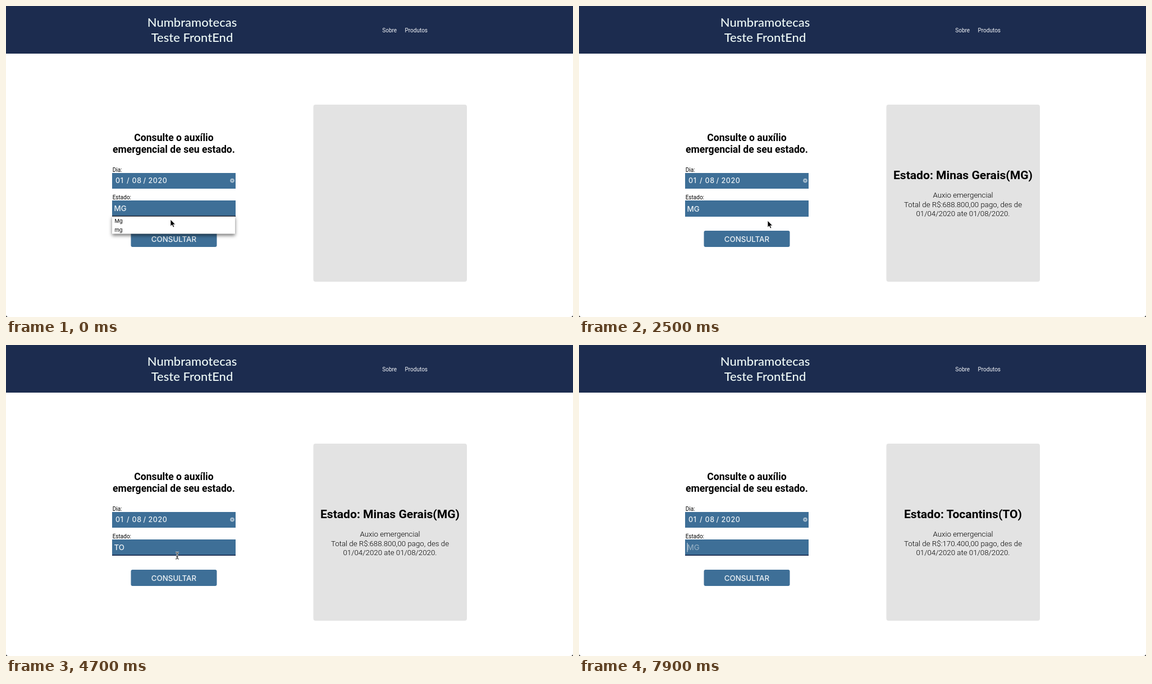
An HTML page for the animation above (8000 ms loop, 1010 px wide and 555 px high).

```html
<!DOCTYPE html>
<html lang="pt-BR">
<head>
<meta charset="utf-8">
<title>Consulta</title>
<style>
  html, body { margin: 0; width: 100%; height: 100%; overflow: hidden; background: #fff; }
  svg { display: block; width: 100%; height: 100%; }
  text { font-family: Roboto, sans-serif; white-space: pre; }
  .brand { font: 500 22px Lato, sans-serif; fill: #effbf8; }
  .nav { font-size: 10px; fill: #f4f6fa; }
  .heading { font-size: 17.6px; font-weight: 700; }
  .label { font-size: 10px; }
  .field { font: 500 13.3px Inter, sans-serif; fill: #eef3f6; }
  .date { font: 500 12.5px Inter, sans-serif; letter-spacing: .6px; fill: #eef3f6; }
  .option { font: 9.5px Inter, sans-serif; }
  .result { font-size: 21.1px; font-weight: 700; }
  .detail { font-size: 13.3px; font-weight: 300; }
  .mid { text-anchor: middle; }
  .blue { fill: #3e6f97; }
  #menu rect { filter: drop-shadow(0 3px 3px rgba(0, 0, 0, .55)); }
</style>
</head>
<body>
<svg viewBox="0 0 1010 555">
  <rect width="1010" height="85" fill="#1c2c4f"/>
  <g class="brand mid">
    <text class="brand" x="331.5" y="37">Numbramotecas</text>
    <text class="brand" x="331.5" y="64">Teste FrontEnd</text>
  </g>
  <text class="nav" x="670.3" y="47.3">Sobre</text>
  <text class="nav" x="710.5" y="47.3">Produtos</text>

  <g class="mid">
    <text class="heading" x="299" y="241">Consulte o auxílio</text>
    <text class="heading" x="299" y="262.3">emergencial de seu estado.</text>
  </g>

  <text class="label" x="189.7" y="295.5">Dia:</text>
  <rect class="blue" x="189" y="298" width="220" height="28"/>
  <text class="date" x="195" y="316">01</text>
  <text class="date" x="215" y="316">/</text>
  <text class="date" x="224.5" y="316">08</text>
  <text class="date" x="244.5" y="316">/</text>
  <text class="date" x="253.5" y="316">2020</text>
  <circle cx="403" cy="311.6" r="3.8" fill="#a9bfd0"/>
  <path d="M401.6 310.2l2.8 2.8m0-2.8l-2.8 2.8" stroke="#3e6f97"/>

  <text class="label" x="189.7" y="344.5">Estado:</text>
  <rect class="blue" x="189" y="347" width="220" height="29"/>
  <rect id="underline" x="189" y="374.3" width="220" height="1.7" fill="#1c2c4f"/>
  <text id="value" class="field" x="192.5"></text>
  <rect id="caret" y="353" width="1" height="16.5" fill="#dfe8ee"/>

  <rect class="blue" x="222.5" y="401" width="153" height="29" rx="3"/>
  <rect id="hover" x="222.5" y="401" width="153" height="29" rx="3" fill="#1f4a70"/>
  <text class="field mid" x="299" y="420.6">CONSULTAR</text>

  <g id="menu">
    <rect x="189" y="375" width="219" height="31.5" fill="#fff"/>
    <path d="M189 375.2h219" stroke="#222"/>
    <text class="option" x="193.5" y="387">Mg</text>
    <text class="option" x="193.5" y="402.7">mg</text>
  </g>

  <rect x="547.5" y="176" width="273.5" height="316" rx="4" fill="#e3e3e3"/>
  <g id="panel" class="mid">
    <text id="state" class="result" x="684" y="309.3"></text>
    <text class="detail" x="684" y="342">Auxio emergencial</text>
    <text id="total" class="detail" x="684" y="358.5"></text>
    <text class="detail" x="684" y="375">01/04/2020 ate 01/08/2020.</text>
  </g>

  <path d="M0 555v-4q0 4 4 4zM1010 555v-4q0 4-4 4z"/>

  <g id="cursor">
    <path id="arrow" d="M0 0V12.2L2.8 9.6 4.8 14 6.8 13.1 4.9 8.9H8.7Z" stroke="#fff" stroke-width=".8"/>
    <path id="hand" d="M-1 1.2q1-2 2 0V5q1-1 2 .4 1.2-.8 2 .6 1.8-.6 1.8 1.2V9.5L5.5 13.6H-.2L-4 8.6q.2-1.8 1.6-.8L-1 9Z" fill="#fff" stroke="#111"/>
    <g id="beam" fill="none">
      <path d="M-3-6Q0-6 0-4 0-6 3-6M0-4V4M-3 6Q0 6 0 4 0 6 3 6M-2 2H2" stroke="#fff" stroke-width="2.6"/>
      <path d="M-3-6Q0-6 0-4 0-6 3-6M0-4V4M-3 6Q0 6 0 4 0 6 3 6M-2 2H2" stroke="#111"/>
    </g>
  </g>
</svg>
<script>
const LOOP = 8000;
const el = id => document.getElementById(id);
const show = (id, on) => el(id).setAttribute("visibility", on ? "inherit" : "hidden");
const within = (t, spans) => spans.some(([from, to]) => t >= from && t < to);
const clamp = v => Math.max(0, Math.min(1, v));
const latest = (list, t) => list.filter(item => item[0] <= t).pop();

const edits = [[-700, "MG"], [3200, "M"], [3500, ""], [3800, "T"], [4000, "TO"], [7500, "T"], [7700, ""]];
const results = [[0, "", ""], [1700, "Minas Gerais(MG)", "688.800,00"], [5700, "Tocantins(TO)", "170.400,00"]];
const focused = [[0, 1500], [2900, 5400], [7200, LOOP]];
const hidden = [[3100, 4500], [7400, LOOP]];
const hovers = [[1000, 1900], [5000, 6000]];

// time, x, y of the pointer's hot spot
const route = [
  [0, 293, 381], [300, 293, 381], [1000, 309, 419], [1800, 309, 419], [2300, 336, 383],
  [2500, 336, 383], [2800, 282, 359], [4500, 282, 359], [4700, 305, 376], [5050, 309, 419],
  [5900, 309, 419], [6400, 323, 376.5], [6800, 323, 376.5], [7100, 282, 359], [LOOP, 282, 359]
];

function pointerAt(t) {
  const i = route.findIndex(stop => stop[0] > t);
  const [t0, x0, y0] = route[i - 1], [t1, x1, y1] = route[i];
  const p = (t - t0) / (t1 - t0), k = p * p * (3 - 2 * p);
  return [x0 + (x1 - x0) * k, y0 + (y1 - y0) * k];
}

function draw(t) {
  const focus = within(t, focused);
  const [editTime, text] = latest(edits, t);
  const value = el("value");
  value.textContent = text || "MG";
  value.setAttribute("y", focus ? 366 : 367);
  value.style.fill = text ? "" : "#8fabc0";
  show("underline", focus);
  show("caret", focus && (t - editTime) % 1000 < 500);
  el("caret").setAttribute("x", text ? 193 + value.getComputedTextLength() : 192.5);
  show("menu", t < 1500);

  const [, state, total] = latest(results, t);
  show("panel", state);
  el("state").textContent = "Estado: " + state;
  el("total").textContent = `Total de R$:${total} pago, des de`;

  const shade = hovers.map(([from, to]) => Math.min(clamp((t - from) / 200), clamp((to + 200 - t) / 200)));
  el("hover").setAttribute("opacity", Math.max(...shade));

  const [x, y] = pointerAt(t);
  const onButton = y > 407 && y < 430;
  const onField = y > 347 && y <= 376.2;
  el("cursor").setAttribute("transform", `translate(${x} ${y})`);
  show("cursor", !within(t, hidden));
  show("hand", onButton);
  show("beam", onField);
  show("arrow", !onButton && !onField);
}

const start = performance.now();
function tick() {
  const elapsed = (performance.now() - start) % LOOP;
  draw(Math.floor(elapsed / 100) * 100);
  requestAnimationFrame(tick);
}
tick();
</script>
</body>
</html>
```
